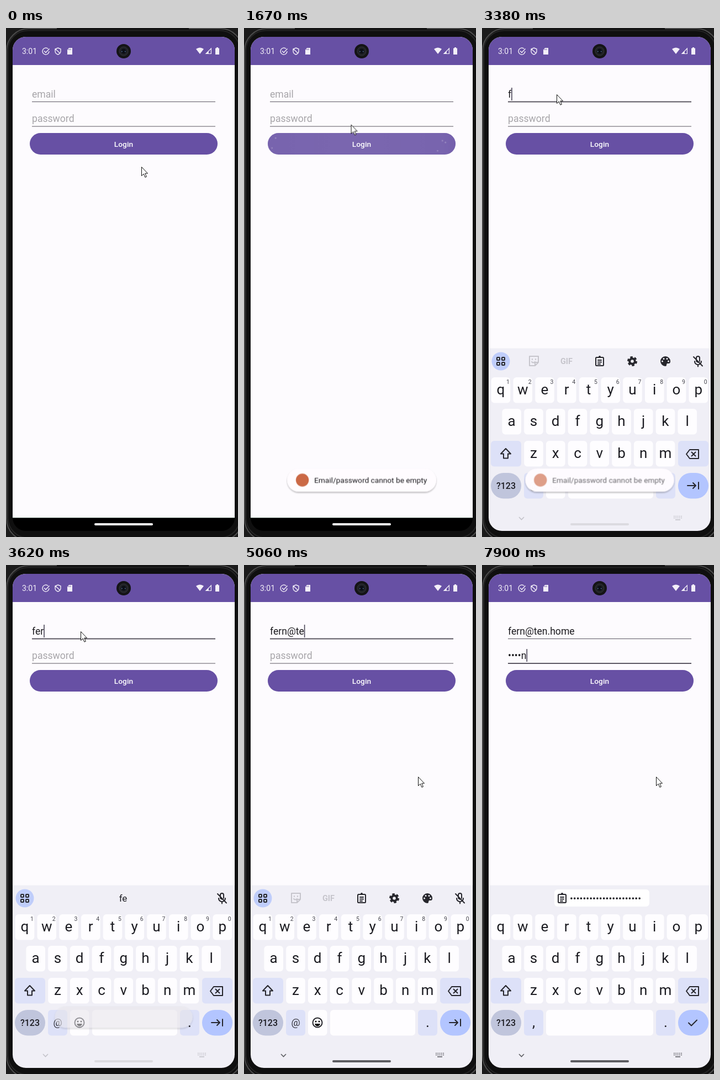
An HTML page that plays this animation: 420x921 px, repeating every 8 s.

```html
<!DOCTYPE html>
<html lang="en">
<head>
<meta charset="utf-8">
<title>Login form</title>
<style>
  html, body { margin: 0; width: 100%; height: 100%; overflow: hidden; background: #1b1b1b; }
  svg { display: block; width: 420px; height: 921px; }
  text { font-family: Roboto, "Noto Sans", sans-serif; white-space: pre; }
  .field { font-size: 17.6px; fill: #1c1b1f; }
  .hint { fill: #a7a5a9; }
  .mid { text-anchor: middle; }
  .key { font-size: 26px; fill: #1b1b21; }
  .digit { font-size: 10.5px; fill: #46464f; }
  .line { fill: none; stroke: #26262c; stroke-width: 2; stroke-linecap: round; stroke-linejoin: round; }
  .off { stroke: #c6c5cc; }

  #pointer, #keys, #toast, #toastBox, #toastBody, #ripple, #pill, #nav {
    animation: 8s linear infinite;
  }
  #pointer { animation-name: point; }
  #keys { animation-name: rise; }
  #toast { animation-name: toast; transform-origin: 213px 818px; }
  #toastBox { animation-name: dim; }
  #toastBody { animation-name: body; }
  #ripple { animation-name: ripple; transform-origin: 205px 210px; }
  #pill { animation-name: pill; }
  #nav { animation-name: nav; }

  @keyframes point {
    0%, 1.4% { transform: translate(245px, 251px); }
    1.5%, 4.3% { transform: translate(244px, 251px); }
    5.9% { transform: translate(222px, 270px); }
    8.9% { transform: translate(90px, 205px); }
    10.4% { transform: translate(41px, 145px); }
    11.9% { transform: translate(115px, 172px); }
    13.4%, 17.9% { transform: translate(202px, 199px); }
    23.9% { transform: translate(185px, 150px); }
    31.4%, 51.25% { transform: translate(135px, 120px); animation-timing-function: ease-in-out; }
    58.75%, 100% { transform: translate(315px, 383px); }
  }
  @keyframes rise {
    0%, 38.75% { transform: translateY(340px); animation-timing-function: ease-out; }
    42%, 100% { transform: none; }
  }
  @keyframes toast {
    0%, 17.9% { opacity: 0; transform: scale(.92); }
    20.9%, 42.2% { opacity: 1; transform: none; }
    45.2% { opacity: .6; transform: scale(.925); }
    46.7%, 100% { opacity: 0; transform: scale(.9); }
  }
  @keyframes dim {
    0%, 42.2% { fill: #fffcff; }
    45%, 100% { fill: #e6e5eb; }
  }
  @keyframes body {
    0%, 41% { opacity: 1; }
    44.5%, 100% { opacity: 0; }
  }
  @keyframes ripple {
    0%, 13% { opacity: 0; transform: scale(.1); }
    13.4% { opacity: 1; transform: scale(.4); }
    14.8% { opacity: 1; transform: scale(.98); }
    16.4% { opacity: 1; transform: scale(1.06); }
    20.9% { opacity: .8; transform: scale(3); }
    23.8%, 100% { opacity: 0; transform: scale(3.4); }
  }
  @keyframes pill {
    0%, 39.5% { fill: #fff; }
    41%, 51.25% { fill: #dcdbe0; }
    55.5%, 100% { fill: #5d5d63; }
  }
  @keyframes nav {
    0%, 51.25% { opacity: .3; }
    55.5%, 100% { opacity: 1; }
  }
</style>
</head>
<body>
<svg viewBox="0 0 420 921">
  <defs>
    <clipPath id="screen"><rect x="12" y="16" width="402" height="894" rx="24"/></clipPath>
    <clipPath id="button"><rect x="43" y="190" width="340" height="39" rx="19.5"/></clipPath>
    <radialGradient id="glow">
      <stop offset="0" stop-color="#fff" stop-opacity=".16"/>
      <stop offset=".62" stop-color="#fff" stop-opacity=".15"/>
      <stop offset="1" stop-color="#fff" stop-opacity="0"/>
    </radialGradient>
    <filter id="shade" x="-10%" y="-30%" width="120%" height="170%">
      <feDropShadow dx="0" dy="2" stdDeviation="1.6" flood-opacity=".28"/>
    </filter>
    <g id="clipboard" class="line">
      <rect x="-7" y="-7" width="14" height="15" rx="1.5"/>
      <path d="M-3-7h6M-3-2H3M-3 1.5H3M-3 5H1"/>
      <circle cy="-8" r="1"/>
    </g>
  </defs>

  <!-- phone body -->
  <rect width="420" height="921" fill="#1b1b1b"/>
  <rect x="1" y="1" width="427" height="927" rx="40" fill="#0f0f0f" stroke="#4c4c4c" stroke-width="2"/>
  <rect x="3.5" y="4.5" width="420" height="918" rx="36" fill="none" stroke="#242424" stroke-width="2"/>
  <path d="M92 1H331" stroke="#151515" stroke-width="2"/>

  <g clip-path="url(#screen)">
    <rect x="12" y="16" width="402" height="870" fill="#fdfbfe"/>
    <rect x="12" y="16" width="402" height="51" fill="#6750a4"/>
    <rect x="12" y="886" width="402" height="24" fill="#000"/>
    <path d="M12 886.5H414" stroke="#2c4437"/>

    <!-- status bar -->
    <text x="29" y="47" font-size="14" fill="#f3eff8">3:01</text>
    <g fill="none" stroke="#f3eff8" stroke-width="1.4">
      <path d="M76 37.6A6 6 0 1 0 78 42M69 41.5l3 3 6.5-7"/>
      <path d="M94 36l5 2v4c0 3-2 5-5 6-3-1-5-3-5-6v-4zM89.500 38l8.500 8"/>
    </g>
    <g fill="#f3eff8">
      <path d="M114 36h6v12h-9V39.500z"/>
      <path d="M344 38q7-5 14 0l-7 9z"/>
      <path d="M372 35.500V47H360.500zm-1.200 3l-4 4V46h4z" fill-rule="evenodd"/>
      <path d="M381 35h3v1.500h2V48h-7V36.500h2z"/>
    </g>
    <path d="M113 38v2M115 37.500v2.500M117 37.500v2.500" stroke="#6750a4" stroke-width=".8"/>
    <circle cx="213" cy="42" r="13" fill="#141416"/>
    <circle cx="213" cy="42" r="8" fill="#202226" stroke="#303238"/>
    <circle cx="213" cy="42" r="4.500" fill="#0c0f16"/>
    <path d="M209 42.500h1.500M215 42.500h1.500" stroke="#5a78a8" stroke-width="1.500"/>

    <!-- form -->
    <text id="mailHint" class="field hint" x="47" y="126">email</text>
    <text id="passHint" class="field hint" x="47" y="170">password</text>
    <text id="mail" class="field" x="47" y="126"></text>
    <text id="pass" class="field" x="47" y="170"></text>
    <path id="mailLine" d="M47 133.500H379" stroke="#5c5863"/>
    <path id="passLine" d="M47 178H379" stroke="#5c5863"/>
    <rect id="caret" width="1.600" height="23" fill="#4b4658"/>
    <rect x="43" y="190" width="340" height="39" rx="19.5" fill="#6750a4"/>
    <g clip-path="url(#button)">
      <g id="ripple"><circle cx="205" cy="210" r="84" fill="url(#glow)"/></g>
    </g>
    <text class="mid" x="213" y="214.500" font-size="13.700" font-weight="500" letter-spacing=".1" fill="#fff">Login</text>

    <!-- keyboard -->
    <g id="keys">
      <rect x="12" y="579.500" width="402" height="331" fill="#f0eff6"/>
      <g id="plainKeys"></g>
      <g class="line">
        <path d="M43 761l-9 9.500h5v8h8v-8h5z"/>
        <path d="M376 763h16v16H376l-6-8zM379.500 767.500l7 7m0-7l-7 7"/>
      </g>
      <text class="mid" x="43.500" y="833.500" font-size="16" font-weight="500" fill="#1b1b21">?123</text>
      <g id="mailKeys">
        <text class="mid" x="93.500" y="834" font-size="18" fill="#33333b">@</text>
        <circle class="line" cx="133" cy="828" r="8.500"/>
        <circle cx="130" cy="826" r="1.500"/><circle cx="136" cy="826" r="1.500"/>
        <path d="M128 830h10q-1.500 4.500-5 4.500t-5-4.500z"/>
        <path class="line" d="M372 828h15m-5-5l5 5-5 5m10-11v12"/>
      </g>
      <g id="passKeys">
        <text class="mid key" x="93.500" y="836" font-size="22">,</text>
        <path class="line" d="M374 828.500l5 5 10-10"/>
        <rect x="131" y="587" width="172" height="31" rx="6" fill="#fff"/>
        <use href="#clipboard" x="145" y="603"/>
        <text id="stars" x="159" y="609" font-size="17.400" fill="#1b1b21"></text>
      </g>
      <g id="grid">
        <circle cx="34" cy="603" r="16.500" fill="#bfcdfb"/>
        <g class="line" stroke-width="1.800">
          <rect x="27" y="596" width="5" height="5" rx="1"/><rect x="36" y="596" width="5" height="5" rx="1"/>
          <rect x="27" y="605" width="5" height="5" rx="1"/><rect x="36" y="605" width="5" height="5" rx="1"/>
        </g>
      </g>
      <g id="mic" class="line">
        <path d="M388 600v-3a3 3 0 0 1 6 0v6M388 601.500a3 3 0 0 0 4 3M385 603a6 6 0 0 0 9.500 5M397 603q0 1.500-.7 3M391 609.500v3M383 595l16 16.500"/>
      </g>
      <text id="guess" class="mid" x="212" y="609" font-size="17" fill="#1b1b21"></text>
      <g id="tools">
        <path class="line off" d="M86 594h16v11l-6 6H86zM102 605h-6v6M91 599v1M97 599v1M90 604q3 3 6 0"/>
        <text class="mid" x="153" y="608" font-size="14.500" font-weight="700" fill="#c6c5cc">GIF</text>
        <use href="#clipboard" x="213" y="603"/>
        <g transform="translate(272 603)" fill="none" stroke="#26262c" stroke-width="4">
          <circle r="4.800"/><circle r="7.300" stroke-width="3.400" stroke-dasharray="4.300 3.344"/>
        </g>
        <path d="M332 594a9 9 0 0 0 0 18q2 0 2-2t1-3h3q3 0 3-4a9 9 0 0 0-9-9z" fill="#26262c"/>
        <g fill="#f0eff6">
          <circle cx="326.500" cy="603" r="1.500"/><circle cx="329" cy="598.500" r="1.500"/>
          <circle cx="335" cy="598.500" r="1.500"/><circle cx="337.500" cy="603" r="1.500"/>
        </g>
      </g>
      <g id="nav" fill="none" stroke="#5d5d63" stroke-width="1.600">
        <path d="M67 885l4.500 4.500 4.500-4.500"/>
        <path d="M347 883.500h15M347 886.500h15" stroke-dasharray="1.800 1.500"/>
        <path d="M350 889.800h9"/>
      </g>
    </g>
    <rect id="pill" x="160" y="896" width="106" height="4" rx="2"/>

    <g id="toast">
      <rect id="toastBox" x="78" y="797" width="270" height="42" rx="21" filter="url(#shade)"/>
      <g id="toastBody">
        <circle cx="105.500" cy="818" r="11.700" fill="#cb6845"/>
        <text x="127" y="823.300" font-size="13.700" fill="#1c1b1f">Email/password cannot be empty</text>
      </g>
    </g>
  </g>

  <path id="pointer" d="M.5.500V16.500l3.700-3.500 2.700 6.200 2.500-1.100-2.700-6H11.500z" fill="#fff" stroke="#111"/>
</svg>
<script>
  const LOOP = 8000, LEFT = 47;
  const MAIL = "fern@ten.home", PASS = "ocean";
  const mailTimes = [3380, 3500, 3620, 3740, 4700, 4940, 5060, 5300, 5530, 6270, 6390, 6500, 6620];
  const passTimes = [7180, 7300, 7540, 7660, 7900];
  const MAIL_FOCUS = 2510, CARET_ON = 2630, PASS_FOCUS = 6740, PASS_KEYS = 6840;
  const $ = id => document.getElementById(id);

  function add(parent, tag, attrs, text = "") {
    const node = document.createElementNS("http://www.w3.org/2000/svg", tag);
    for (const name in attrs) node.setAttribute(name, attrs[name]);
    node.textContent = text;
    return parent.appendChild(node);
  }

  // keyboard
  const keys = $("plainKeys");
  const cap = (x, y, width, fill = "#fefdff", rx = 6) =>
    add(keys, "rect", { x, y, width, height: 46.5, rx, fill });
  const digits = [];
  [["qwertyuiop", 34, 632], ["asdfghjkl", 53.7, 689], ["zxcvbnm", 93.5, 747]].forEach(([row, start, y], r) => {
    [...row].forEach((letter, i) => {
      const x = start + i * 39.75;
      cap(x - 17.3, y, 34.6);
      add(keys, "text", { x, y: y + 31, class: "mid key" }, letter);
      if (!r) digits.push(add(keys, "text", { x: x + 13, y: y + 12, class: "mid digit" }, (i + 1) % 10));
    });
  });
  const tint = "#dde1f8";
  cap(16, 747, 55, tint);
  cap(355, 747, 55, tint);
  cap(16, 805, 55, "#c0c5dc", 23);
  cap(76, 805, 35, tint);
  const emojiCap = cap(116, 805, 34.5);
  const space = cap(156, 805, 154);
  cap(315, 805, 35, tint);
  cap(355, 805, 55, "#b3c5ff", 23);
  add(keys, "text", { x: 332.5, y: 836, class: "mid key" }, ".");
  $("stars").textContent = "•".repeat(22);

  // sparkles along the ripple's edge
  const rand = n => Math.abs(Math.sin(n * 127.1) * 43758.5453) % 1;
  for (let i = 0; i < 260; i++) {
    const a = rand(i + 1) * Math.PI * 2, d = 48 + rand(i + 400) * 32;
    add($("ripple"), "circle", {
      cx: 205 + d * Math.cos(a), cy: 210 + d * Math.sin(a), r: .5, fill: "#fff", opacity: .28
    });
  }

  const show = (node, on) => node.style.visibility = on ? "inherit" : "hidden";
  const count = (times, t) => times.filter(at => at <= t).length;

  function render(t) {
    const m = count(mailTimes, t), p = count(passTimes, t);
    const inPass = t >= PASS_FOCUS, passMode = t >= PASS_KEYS;
    const inMail = t >= MAIL_FOCUS && !inPass;

    $("mail").textContent = MAIL.slice(0, m);
    $("pass").textContent = p ? "•".repeat(p - 1) + PASS[p - 1] : "";
    show($("mailHint"), !m);
    show($("passHint"), !p);
    $("mailLine").setAttribute("stroke-width", inMail ? 2 : 1.2);
    $("passLine").setAttribute("stroke-width", inPass ? 2 : 1.2);

    const last = Math.max(...[CARET_ON, PASS_FOCUS, ...mailTimes, ...passTimes].filter(at => at <= t));
    show($("caret"), t >= CARET_ON && (t - last) % 1000 < 490);
    const active = $(inPass ? "pass" : "mail");
    $("caret").setAttribute("x", LEFT + (active.textContent ? active.getComputedTextLength() : 0));
    $("caret").setAttribute("y", inPass ? 152 : 108);

    const guessing = m >= 2 && m < 5;
    $("guess").textContent = guessing ? MAIL.slice(0, t < 3740 ? 2 : 4) : "";
    show($("tools"), !guessing && !inPass);
    show($("mic"), !inPass);
    show($("grid"), !passMode);
    show($("mailKeys"), !passMode);
    show($("passKeys"), passMode);
    show(emojiCap, !passMode);
    digits.forEach(d => show(d, !passMode));
    space.setAttribute("x", passMode ? 116 : 156);
    space.setAttribute("width", passMode ? 194 : 154);
  }

  let start;
  function tick(now) {
    start ??= now;
    render((now - start) % LOOP);
    requestAnimationFrame(tick);
  }
  render(0);
  requestAnimationFrame(tick);
</script>
</body>
</html>
```
